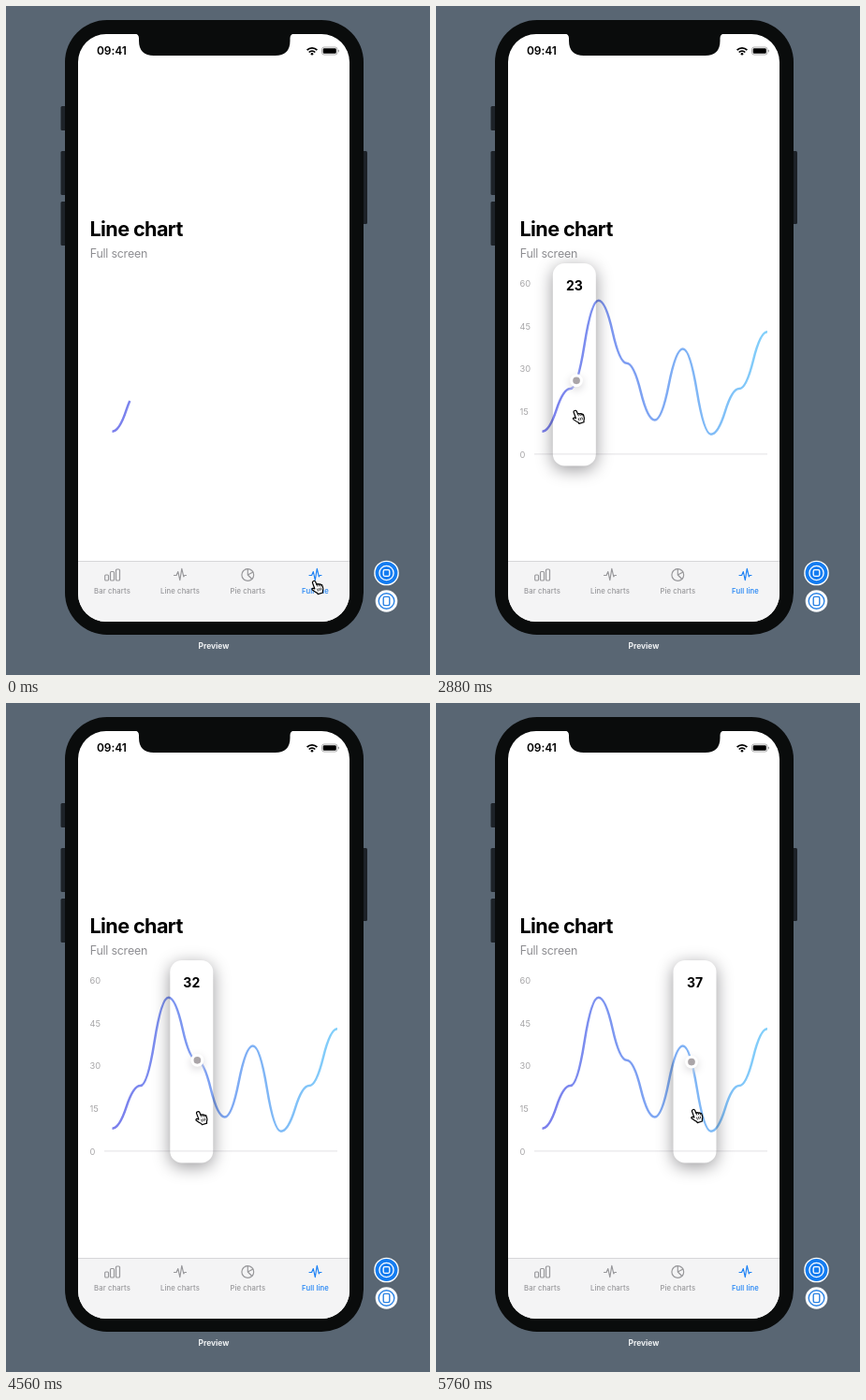
Write an HTML page that moves like this. It is 453 by 715 pixels and loops after 5800 ms.

```html
<!DOCTYPE html>
<html lang="en">
<head>
<meta charset="utf-8">
<title>Line chart preview</title>
<style>
  html, body { margin: 0; width: 100%; height: 100%; overflow: hidden; background: #596673; }
  svg { display: block; width: 453px; height: 715px; font-family: Inter, "Liberation Sans", sans-serif; }

  .title { font-size: 21.6px; font-weight: 700; letter-spacing: -.6px; }
  .subtitle { font-size: 12.4px; letter-spacing: -.2px; fill: #8e8e92; }
  .clock { font-size: 12px; font-weight: 600; letter-spacing: -.05px; }
  .caption { font-size: 8.4px; font-weight: 700; fill: #f0f2f4; text-anchor: middle; }

  .tab { color: #97979a; }
  .tab.on { color: #1b80f5; }
  .tab text { font-size: 7.7px; font-weight: 500; letter-spacing: .12px; fill: currentColor; text-anchor: middle; }
  .icon { fill: none; stroke: currentColor; stroke-width: 1.15; stroke-linejoin: round; stroke-linecap: round; }

  #legend { font-size: 9.3px; fill: #a7a6a8; animation: legend 5.8s infinite; }
  #legend line { stroke: #e8e7ea; stroke-width: 1.16; }
  #grid { stroke-dasharray: 3.9 7.7; animation: fade-out 5.8s infinite; }
  #line {
    fill: none; stroke: url(#ink); stroke-width: 2.5; stroke-linejoin: round;
    stroke-dasharray: 1 2; animation: trim 5.8s infinite;
  }
  .lens { animation: fade-in 5.8s infinite; }
  .multiply { mix-blend-mode: multiply; }
  #card rect { fill: #fff; filter: drop-shadow(0 4px 9px #98979a); }
  #value { font-size: 14px; font-weight: 700; text-anchor: middle; }
  #dot { fill: #aaa5a8; stroke: #fff; stroke-width: 3.1; filter: drop-shadow(0 3px 4px #d8d7da); }

  /* The line is already under way when the loop begins. */
  @keyframes trim {
    0% { stroke-dashoffset: .938; animation-timing-function: cubic-bezier(.139, .232, .629, 1); }
    19.9%, 100% { stroke-dashoffset: 0; }
  }
  @keyframes legend {
    0%, 16.47% { opacity: 0; animation-timing-function: ease-out; }
    37.16%, 100% { opacity: 1; }
  }
  @keyframes fade-in {
    0%, 43.1% { opacity: 0; animation-timing-function: ease-out; }
    46.55%, 100% { opacity: 1; }
  }
  @keyframes fade-out {
    0%, 43.1% { opacity: 1; animation-timing-function: ease-out; }
    46.55%, 100% { opacity: 0; }
  }
</style>
</head>
<body>
<svg viewBox="0 0 453 715">
  <defs>
    <linearGradient id="ink" gradientUnits="userSpaceOnUse" x1="113" y1="0" x2="354" y2="0">
      <stop stop-color="#7a7dec"/>
      <stop offset="1" stop-color="#82d0fa"/>
    </linearGradient>
    <clipPath id="glass"><rect x="77" y="30" width="290" height="628" rx="30"/></clipPath>
    <path id="pulse" class="icon" d="M-6.500 .5h2.600l1.700-4 2 9.200 2-12.300 2 8.500 1-1.400h1.700"/>
  </defs>

  <!-- phone body -->
  <rect width="453" height="715" fill="#596673"/>
  <g fill="#1d2228">
    <rect x="58.500" y="107" width="8" height="26" rx="1.500"/>
    <rect x="58.500" y="155" width="8" height="47" rx="1.500"/>
    <rect x="58.500" y="209" width="8" height="47" rx="1.500"/>
    <rect x="378" y="155" width="8" height="78" rx="1.500"/>
  </g>
  <rect x="63" y="15" width="319" height="657" rx="45" fill="#0a0c0c"/>
  <rect x="77" y="30" width="290" height="628" rx="30" fill="#fff"/>
  <path d="M137.500 29.500q4.500 .5 4.500 5v2.500q0 16 16 16h129.500q16 0 16-16v-2.500q0-4.500 4.500-5z" fill="#0a0c0c"/>

  <!-- status bar -->
  <text class="clock" x="97" y="52.300">09:41</text>
  <g fill="none" stroke="#000" stroke-width="1.700">
    <path d="M321.600 47.100a7.500 7.500 0 0 1 10.800 0M323.700 49.500a4.600 4.600 0 0 1 6.600 0"/>
  </g>
  <circle cx="327" cy="51.300" r="1.300"/>
  <rect x="337.500" y="44" width="16.500" height="8" rx="2.300" fill="none" stroke="#9a9a9a" stroke-width=".8"/>
  <rect x="338.700" y="45.200" width="14.100" height="5.600" rx="1.300"/>
  <rect x="354.800" y="46.700" width="1" height="2.600" rx=".5" fill="#9a9a9a"/>

  <!-- chart -->
  <text class="title" x="89.500" y="245.500">Line chart</text>
  <text class="subtitle" x="89.700" y="269">Full screen</text>
  <g id="legend">
    <g id="labels"></g>
    <line x1="105" x2="354" y1="478.800" y2="478.800"/>
    <g id="grid"></g>
  </g>
  <path id="line" pathLength="1"/>
  <g class="lens multiply">
    <g id="card">
      <rect x="-23" y="275" width="46" height="216.500" rx="12.400"/>
      <text id="value" y="303.600"></text>
    </g>
  </g>
  <g class="lens"><circle id="dot" r="5.400"/></g>

  <!-- tab bar -->
  <g clip-path="url(#glass)">
    <rect x="77" y="593" width="290" height="66" fill="#f4f4f5"/>
    <rect x="77" y="593" width="290" height=".8" fill="#cfcfd1"/>
  </g>
  <g class="tab" transform="translate(113.500 608)">
    <rect class="icon" x="-7.800" y="0" width="3.800" height="6" rx="1"/>
    <rect class="icon" x="-2" y="-3.500" width="4" height="9.500" rx="1"/>
    <rect class="icon" x="4" y="-6" width="4" height="12" rx="1"/>
    <text y="20.300">Bar charts</text>
  </g>
  <g class="tab" transform="translate(186 608)">
    <use href="#pulse"/>
    <text y="20.300">Line charts</text>
  </g>
  <g class="tab" transform="translate(258.300 608)">
    <circle class="icon" r="6.400"/>
    <path class="icon" d="M0-6.400V0L5.600-3M0 0l4.500 4.500"/>
    <text y="20.300">Pie charts</text>
  </g>
  <g class="tab on" transform="translate(330.500 608)">
    <use href="#pulse"/>
    <text y="20.300">Full line</text>
  </g>

  <!-- preview controls -->
  <text class="caption" x="222" y="687">Preview</text>
  <g transform="translate(406.500 606)" fill="none" stroke="#fff" stroke-width="1.300">
    <circle r="13.300" fill="#fff" stroke="none"/>
    <circle r="11.900" fill="#147cf0" stroke="none"/>
    <circle r="7.600"/>
    <rect x="-3.300" y="-3.300" width="6.600" height="6.600" rx="1.500"/>
  </g>
  <g transform="translate(406.500 636)" fill="none" stroke="#2a82e4" stroke-width="1.400">
    <circle r="11.800" fill="#fff" stroke="none"/>
    <circle r="8.300"/>
    <rect x="-3.300" y="-4.600" width="6.600" height="9.200" rx="1.500"/>
  </g>

  <g id="hand" stroke="#000" stroke-width="1.200" stroke-linejoin="round" stroke-linecap="round">
    <path fill="#fff" d="M-3.600-6.200c.9-.7 1.900-.2 2.300.7l1.300 2.900c.4-.9 1.700-.9 2.100-.1.6-.7 1.700-.5 2 .3.7-.4 1.700 0 1.900.9l.7 2.700c.3 1.400-.2 2.400-.4 3.600l.2 1.200-5.200 1.600-.7-1.200c-1.600-.6-3.600-2-5.300-3.300-1-.8-.2-2 .9-1.700l1.700.6-2.300-6.200c-.3-.7-.2-1.600.8-2z"/>
    <path fill="none" stroke-width=".8" d="M0-2.600l.7 1.800M2.100-2.700l.6 1.700M4.100-2.400l.5 1.500M.6 2l.7 2.100M2.500 1.500l.6 2M4.300 1l.5 1.900"/>
  </g>
</svg>
<script>
  const LOOP = 5800;
  const VALUES = [8, 23, 54, 32, 12, 37, 7, 23, 43];
  const LEFT = 113.5, STEP = 30.06, BASE = 479, UNIT = 3.04;
  const $ = id => document.getElementById(id);
  const yOf = value => BASE - value * UNIT;

  // Each span is two mirrored parabolas, level at the data points.
  function curveY(x) {
    const u = (x - LEFT) / STEP;
    const i = Math.max(0, Math.min(VALUES.length - 2, Math.floor(u)));
    const s = u - i;
    const h = s < .5 ? 2 * s * s : 1 - 2 * (1 - s) ** 2;
    return yOf(VALUES[i] + (VALUES[i + 1] - VALUES[i]) * h);
  }

  function linePath() {
    let d = `M${LEFT} ${yOf(VALUES[0])}`;
    for (let i = 1; i < VALUES.length; i++) {
      const x = LEFT + (i - 1) * STEP;
      const a = yOf(VALUES[i - 1]), b = yOf(VALUES[i]);
      d += `Q${x + STEP / 4} ${a} ${x + STEP / 2} ${(a + b) / 2}`;
      d += `Q${x + STEP * .75} ${b} ${x + STEP} ${b}`;
    }
    return d;
  }

  $('line').setAttribute('d', linePath());
  for (const n of [60, 45, 30, 15, 0]) {
    const y = yOf(n);
    $('labels').innerHTML += `<text x="89.5" y="${y + 3.6}">${n}</text>`;
    if (n) $('grid').innerHTML += `<line x1="111" x2="355" y1="${y}" y2="${y}"/>`;
  }

  // Rows of [time, ...coordinates]
  const HAND = [[0, 332, 621], [1160, 329, 620], [1240, 329, 620], [1800, 138, 436], [1880, 139, 436],
    [2500, 141, 437], [3360, 165, 441], [4120, 185, 442], [4920, 227, 444], [5760, 278, 441]];
  const CARD = [[2500, 139], [3360, 159], [4120, 176], [4920, 216.5], [5760, 276.5]];
  const DOT = [[2500, 139], [3360, 164], [4120, 181], [4920, 223.5], [5760, 273]];

  function at(track, t) {
    const last = track[track.length - 1];
    if (t >= last[0]) return last.slice(1);
    const i = Math.max(1, track.findIndex(row => row[0] > t));
    const a = track[i - 1], b = track[i];
    let k = Math.max(0, (t - a[0]) / (b[0] - a[0]));
    if (a[0] === 1240) k = k * k * (3 - 2 * k);
    return a.slice(1).map((v, j) => v + (b[j + 1] - v) * k);
  }

  function draw(t) {
    const [hx, hy] = at(HAND, t);
    const [cx] = at(CARD, t);
    const [dx] = at(DOT, t);
    $('hand').setAttribute('transform', `translate(${hx} ${hy})`);
    $('card').setAttribute('transform', `translate(${cx} 0)`);
    $('dot').setAttribute('cx', dx);
    $('dot').setAttribute('cy', curveY(dx));
    // The label is cut short for a moment when its number first changes.
    const cut = t > 3170 && t < 3450;
    $('value').setAttribute('x', cut ? -2 : 0);
    $('value').textContent = cut ? '...' : VALUES[Math.round((dx - LEFT) / STEP)];
  }

  let start;
  function tick(now) {
    start ??= now;
    draw((now - start) % LOOP);
    requestAnimationFrame(tick);
  }
  draw(0);
  requestAnimationFrame(tick);
</script>
</body>
</html>
```
